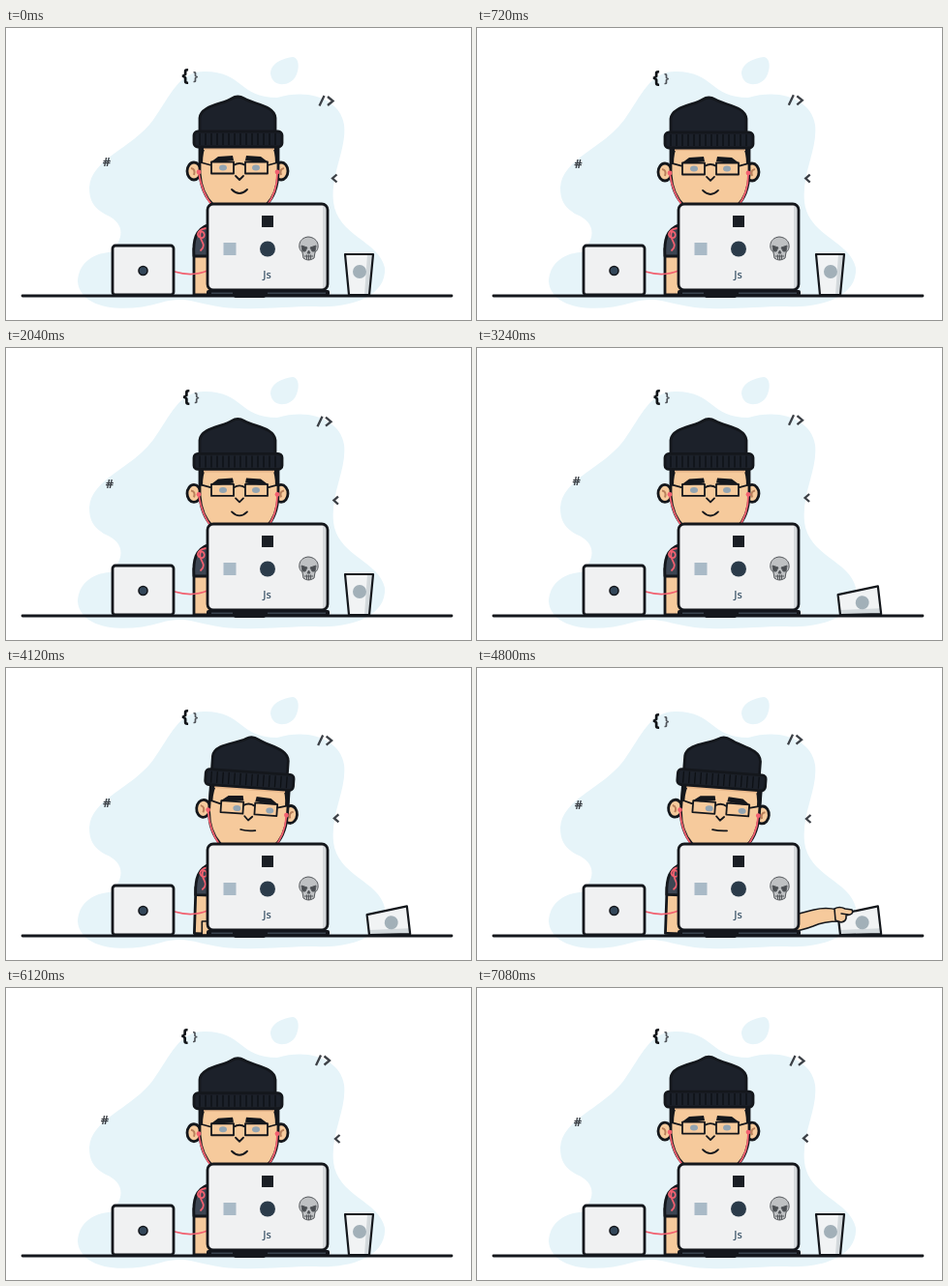
Animation, 480 px wide and 302 px high, one loop 7120 ms. Source, as an HTML page:

```html
<!DOCTYPE html>
<html lang="en">
<head>
<meta charset="utf-8">
<title>Coder at a desk</title>
<style>
html, body { margin: 0; width: 100%; height: 100%; overflow: hidden; background: #fff; }
svg { display: block; width: 480px; height: 302px; }
text { font-family: "Open Sans", sans-serif; text-anchor: middle; }
.ink { stroke: #14171c; stroke-width: 2.8; stroke-linejoin: round; stroke-linecap: round; }
.line { fill: none; stroke-width: 1.8; }
.skin { fill: #f6ca9c; }
.cord { fill: none; stroke: #f2606f; stroke-width: 1.8; stroke-linecap: round; }
.mark { fill: none; stroke: #3c4046; stroke-width: 2.3; }
</style>
</head>
<body>
<svg viewBox="0 0 480 302">
  <g fill="#e6f4f9">
    <path d="M86 165C88 135 130 125 152 95C170 70 178 45 205 45C245 45 240 72 280 72C315 62 345 75 349 100C352 125 335 150 338 180C342 215 385 220 391 248C393 280 350 290 320 288C290 288 270 291 240 290C200 289 190 275 160 284C120 296 76 290 74 262C75 240 95 232 108 232C125 215 120 200 103 193C90 186 86 178 86 165Z"/>
    <path d="M273 47C273 36 287 31 296 30C303 31 303 42 299 50C294 60 275 63 273 47Z"/>
  </g>

  <g id="braces" font-weight="800">
    <text x="-5" y="5.5" font-size="17" fill="#111418">{</text>
    <text x="5.5" y="4.5" font-size="13" font-weight="700" fill="#50545a">}</text>
  </g>
  <g id="tag" class="mark"><path d="M-7.5 5L-2.5 -5.5M1 -4.5L6.5 0L1 4.5"/></g>
  <text id="hash" y="4.8" font-size="13" font-weight="700" fill="#3c4046">#</text>
  <g id="angle" class="mark"><path d="M2.5 -4L-2 0L2.5 4"/></g>

  <path class="ink" d="M17 277H460" stroke-width="2.5"/>

  <g id="body">
    <path class="ink skin" d="M194 276V228H212V276Z"/>
    <path class="ink" fill="#3d4653" d="M194 236C193 220 195 208 210 203H270V236Z"/>
    <path class="cord" d="M209 207C198 207 195 215 201 217C207 218 205 209 201 211C197 219 209 223 201 230"/>
  </g>

  <g id="head">
    <g class="ink skin">
      <ellipse cx="194" cy="148" rx="7" ry="9"/>
      <ellipse cx="284" cy="148" rx="7" ry="9"/>
      <path d="M200 112V150C202 180 222 194 241 194C262 194 280 180 281 150V112Z"/>
    </g>
    <path fill="none" stroke="#b9805b" stroke-width="2" d="M191 145Q196 146 194 152M287 145Q282 146 284 152"/>
    <path fill="#14171c" d="M199 120H207Q203 128 203 140H199ZM282 120H274Q278 128 278 140H282Z"/>
    <path fill="#e7b689" d="M204 123H277V126H204Z"/>
    <path class="ink" fill="#1c212a" d="M200 108V93C201 80 224 79 233 73Q239 69 246 73C256 79 277 80 278 93V108Z"/>
    <rect class="ink" x="194" y="107" width="91" height="16" rx="4" fill="#1c212a"/>
    <path id="ribs" stroke="#0d1014" stroke-width="1.3"/>
    <g id="eyes" fill="#94a5b2">
      <ellipse cx="224" cy="144.5" rx="4" ry="3"/>
      <ellipse cx="258" cy="144.5" rx="4" ry="3"/>
    </g>
    <path class="ink line" d="M212 138.5H235V150.5H212ZM247 138.5H270V150.5H247ZM235 142Q241 138 247 142M212 142L201 139M270 142L281 139"/>
    <path fill="#14171c" d="M211 139L219 133L234 132L235 137L220 139ZM271 139L263 133L248 132L247 137L262 139Z"/>
    <path class="ink line" d="M237 153L241 157L245 153"/>
    <path class="ink line" id="mouth"/>
    <path class="cord" d="M199 150C201 164 205 174 213 184M280 150C280 164 277 174 269 184"/>
    <g fill="#f2606f"><circle cx="199" cy="149" r="2.4"/><circle cx="280" cy="149" r="2.4"/></g>
  </g>

  <g id="cup">
    <path fill="#f1f3f4" d="M350 234H379L375 276H354Z"/>
    <path fill="#d3d9dc" d="M373 234H379L375 276H370Z"/>
    <circle cx="365" cy="252" r="7" fill="#a2b0b8"/>
    <path class="ink" fill="none" stroke-width="2.2" style="stroke-width:2.2" d="M350 234H379L375 276H354Z"/>
  </g>

  <g id="arm" class="ink skin" style="stroke-width:1.6">
    <path d="M270 262C310 262 332 254 348 250Q360 247 372 250L374 262Q358 262 347 267C330 274 300 276 270 276Z"/>
    <path d="M369 249Q374 246 380 249L387 250Q389 254 385 255L381 256Q382 262 376 263L370 261Z"/>
    <path fill="none" d="M376 254L383 255"/>
  </g>

  <path class="cord" d="M174 252C184 255 196 256 208 251"/>
  <rect class="ink" x="110" y="225" width="63" height="51" rx="3" fill="#f0f1f2"/>
  <circle class="ink" cx="141.500" cy="251" r="4.5" fill="#33475a" style="stroke-width:1.6"/>

  <rect x="207" y="271" width="127" height="6" rx="2" fill="#14171c"/>
  <path fill="#3a444e" d="M212 273.500H234V275H212ZM270 273.500H330V275H270Z"/>
  <path fill="#14171c" d="M235 274H268V277Q268 279 265 279H238Q235 279 235 277Z"/>
  <rect x="208" y="182" width="124" height="89" rx="6" fill="#f0f1f2"/>
  <path fill="#d5d9dc" d="M327 183Q332 184 332 189V265Q332 270 327 270Z"/>
  <rect class="ink" x="208" y="182" width="124" height="89" rx="6" fill="none"/>
  <rect x="264" y="194" width="12" height="12" fill="#1b1f25"/>
  <rect x="224.500" y="222" width="13" height="13" fill="#a9bac7"/>
  <circle cx="270" cy="228.500" r="8" fill="#2b3b4a"/>
  <text x="269.500" y="259" font-size="11" font-weight="600" fill="#3f586c">Js</text>
  <g stroke="#55585c" stroke-width="1">
    <path fill="#bfc1c3" d="M306 232C301 229 301 217 312 216C324 217 324 229 319 232L318 238Q312 242 307 238Z"/>
    <path fill="#4a4d51" d="M305 225L311 227L309 231H306ZM320 225L314 227L316 231H319ZM312.500 230L314 233H311Z"/>
    <path fill="none" d="M308 236H317M310.500 234.500V239M312.500 234.500V240M314.500 234.500V239"/>
  </g>
</svg>
<script>
const LOOP = 7120, FLOAT = LOOP / 2, NOD = LOOP / 12;
const $ = id => document.getElementById(id);
const place = (id, value) => $(id).setAttribute('transform', value);
const ramp = (t, a, b) => Math.min(1, Math.max(0, (t - a) / (b - a)));
const ease = (t, a, b) => { const u = ramp(t, a, b); return u * u * (3 - 2 * u); };

// Drift of the floating symbols: shared key times, then x and y at each.
const times = [0, 620, 1240, 1440, 2040, 2560, 2800, 3240];
const drift = {
  braces: [[190, 190, 190, 190.6, 191.3, 189.5, 190, 190.8], [49, 51, 54, 54, 51, 50, 50, 50.5]],
  tag: [[331, 329.5, 328.5, 329, 329, 327.5, 327.8, 329.5], [75.5, 75, 74.2, 75, 76.2, 75, 74.5, 74.7]],
  hash: [[104, 104.3, 105, 106, 107, 102, 101, 102.7], [138, 139.5, 141, 141.3, 140, 136.5, 136, 137]],
  angle: [[339, 341, 342, 341.6, 340.4, 342, 342, 340.6], [155.5, 155.5, 156, 156.5, 157.6, 156, 155.5, 155]]
};

// Smooth closed curve through the keys
function curve(values, t) {
  const n = times.length;
  const at = i => times[(i + n) % n] + FLOAT * Math.floor(i / n);
  const val = i => values[(i + n) % n];
  const slope = i => (val(i + 1) - val(i - 1)) / (at(i + 1) - at(i - 1));
  let i = n - 1;
  while (times[i] > t) i--;
  const d = at(i + 1) - at(i), u = (t - at(i)) / d, v = 1 - u;
  return v * v * (1 + 2 * u) * val(i) + u * u * (3 - 2 * u) * val(i + 1)
    + d * u * v * (v * slope(i) - u * slope(i + 1));
}

$('ribs').setAttribute('d', Array.from({ length: 14 }, (_, i) => `M${200 + i * 6} 109V121`).join(''));

function draw(t) {
  for (const id in drift) {
    const [x, y] = drift[id].map(v => curve(v, t % FLOAT));
    place(id, `translate(${x} ${y})`);
  }

  const look = ease(t, 3760, 4200) - ease(t, 5320, 5740);
  const nod = 1.25 * (1 - Math.cos(2 * Math.PI * t / NOD));
  place('head', `rotate(${4.3 * look} 239 288) translate(0 ${nod})`);
  place('body', `rotate(${2 * look} 239 288)`);
  place('eyes', `translate(${5 * look} ${look})`);
  $('mouth').setAttribute('d', `M${233 + look} 167Q241 ${175 - 7 * look} 249 167`);

  const fall = ramp(t, 2360, 2780) ** 2;
  const tilt = 83.4 * (fall - ease(t, 4820, 5300));
  place('cup', `rotate(${tilt} 375 276)`);

  // The hand holds a point on the cup while lifting it
  const reach = ease(t, 4040, 4460) - ease(t, 5320, 5700);
  const turn = t > 4820 ? tilt * Math.PI / 180 : 83.4 * Math.PI / 180;
  const gx = -21.2 * Math.cos(turn) + 8.5 * Math.sin(turn);
  const gy = -21.2 * Math.sin(turn) - 8.5 * Math.cos(turn);
  place('arm', `translate(${gx - 6 - 75 * (1 - reach)} ${gy + 22})`);
  $('arm').style.display = reach > 0 ? '' : 'none';
}

function tick() {
  draw(performance.now() % LOOP);
  requestAnimationFrame(tick);
}
tick();
</script>
</body>
</html>
```
